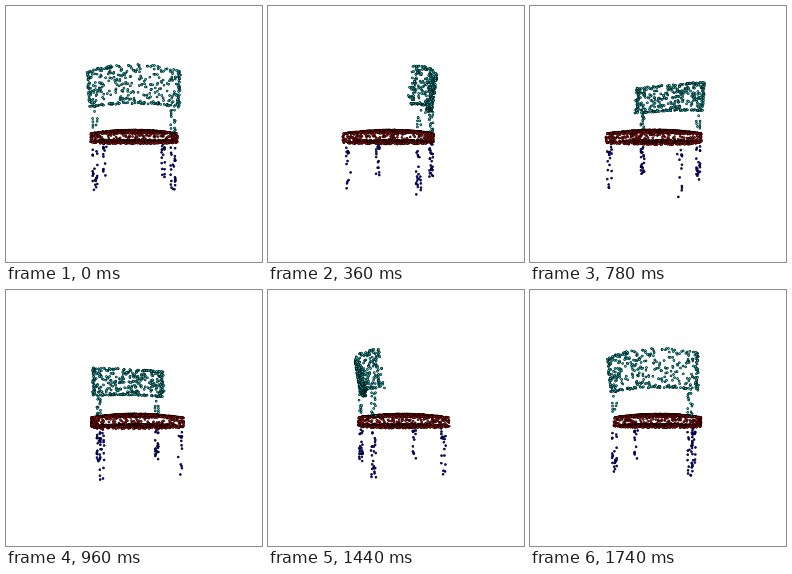
A matplotlib script that plays this animation: 256 px wide and 256 px high, repeating every 1800 ms.

```python
import numpy as np
import matplotlib.pyplot as plt
from matplotlib.animation import FuncAnimation

SIZE, FRAMES, LOOP = 256, 30, 1800
CX, HORIZON, DIST = 128, 126, 213
RED, CYAN, BLUE = (1, 0, 0), (0, 1, 1), (0, 0, 1)

rng = np.random.default_rng(11)


def backrest(n_face=240, n_rim=150):
    """Curved, slightly leaning panel with a denser rim."""
    p = rng.uniform(-1, 1, (n_face + n_rim, 2))
    side = rng.choice(4, n_rim, p=[0.18, 0.18, 0.24, 0.4])
    rim = p[n_face:]
    for k, (axis, sign) in enumerate([(0, -1), (0, 1), (1, 1), (1, -1)]):
        rim[side == k, axis] = sign * rng.uniform(0.93, 1, (side == k).sum())
    a, b = p.T
    z = 39.5 + 15.5 * b - 2.5 * a**2
    depth = 36 - 10 * a**2 + 2.5 * b + rng.choice([-1.5, 1.5], len(a))
    return np.column_stack([40.5 * a, depth, z])


def seat(n_top=520, n_bottom=420, n_side=150):
    """Rounded square cushion with a domed top and a flat underside."""
    n = n_top + n_bottom + n_side
    t = rng.uniform(0, 2 * np.pi, n)
    c, s = np.cos(t), np.sin(t)
    edge = (np.abs(c)**3 + np.abs(s)**3) ** (-1 / 3)
    r = np.sqrt(rng.uniform(0, 1, n))
    r[n_top + n_bottom:] = 1
    z = np.concatenate([
        2 - 3.5 * r[:n_top]**2,
        np.full(n_bottom, -9.8),
        rng.uniform(-9.8, -1.5, n_side),
    ])
    return np.column_stack([42 * r * edge * c, 42 * r * edge * s - 6, z])


def pole(x, y, bottom, top, n, radius=2):
    t = rng.uniform(0, 2 * np.pi, n)
    return np.column_stack([x + radius * np.cos(t), y + radius * np.sin(t),
                            rng.uniform(bottom, top, n)])


parts = [
    (backrest(), CYAN),
    (pole(-33.5, 30, 0, 24, 9), CYAN),
    (pole(33.5, 30, 0, 24, 17), CYAN),
    (seat(), RED),
    (pole(-33.5, 30, -54, -11, 22), BLUE),
    (pole(33.5, 30, -54, -11, 25), BLUE),
    (pole(-33.7, -34, -54, -11, 14), BLUE),
    (pole(33.7, -34, -54, -11, 19), BLUE),
]
points = np.vstack([p for p, _ in parts])
colors = np.vstack([np.tile(c, (len(p), 1)) for p, c in parts])

fig = plt.figure(figsize=(SIZE / 100, SIZE / 100), dpi=100, facecolor="white")
ax = fig.add_axes([0, 0, 1, 1])
ax.set(xlim=(0, SIZE), ylim=(SIZE, 0))
ax.axis("off")
dots = ax.scatter(points[:, 0], points[:, 1], s=1.9, c=colors,
                  edgecolors="black", linewidths=0.45)


def update(i):
    angle = 2 * np.pi * i / FRAMES
    c, s = np.cos(angle), np.sin(angle)
    x, y, z = points.T
    near = y * c - x * s
    scale = DIST / (DIST - near)
    xy = np.column_stack([CX + (x * c + y * s) * scale, HORIZON - z * scale])
    order = np.argsort(near)
    dots.set_offsets(xy[order])
    dots.set_facecolors(colors[order])
    return dots,


anim = FuncAnimation(fig, update, frames=FRAMES, interval=LOOP / FRAMES,
                     repeat=True, repeat_delay=0)
plt.show()
```
